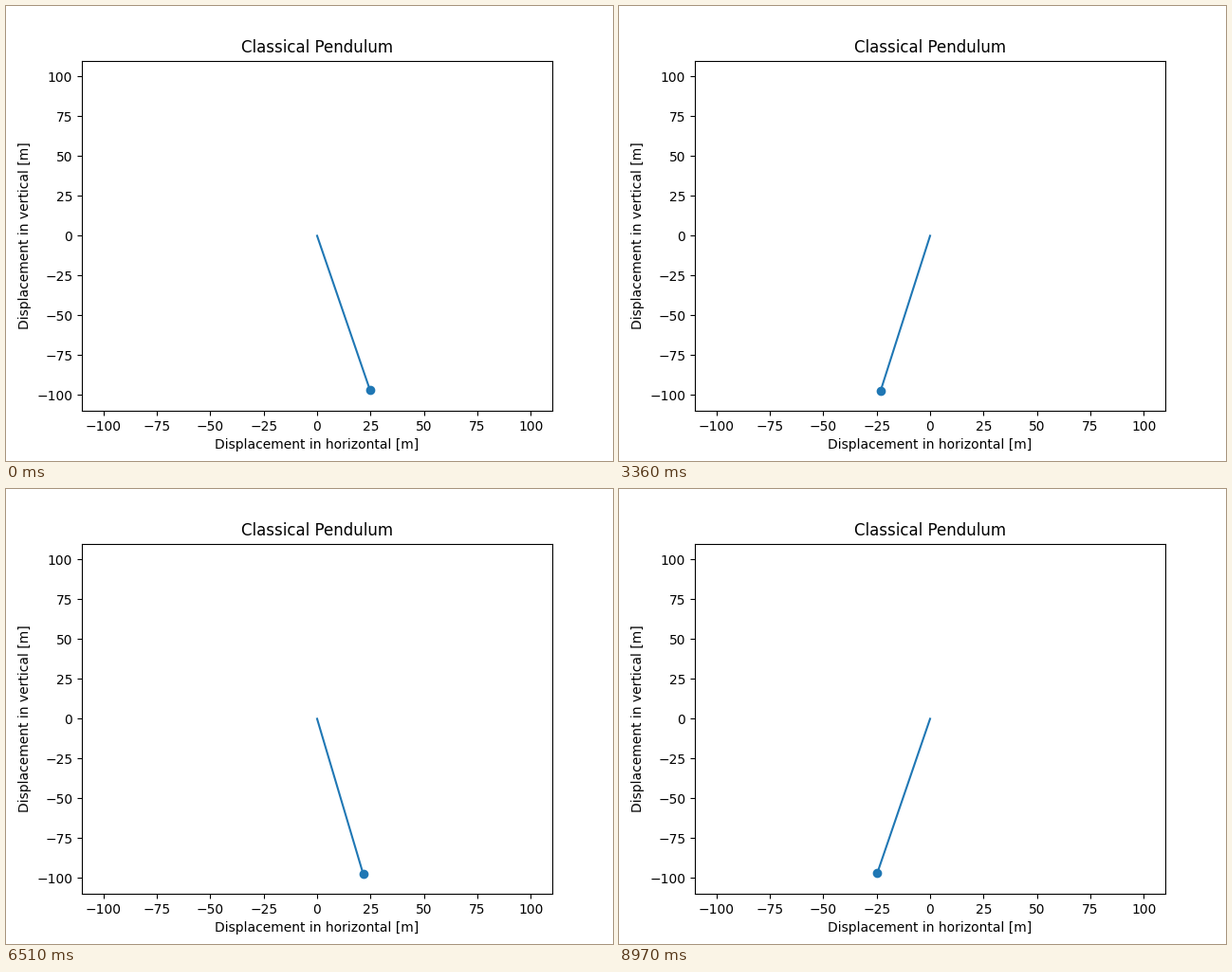
A matplotlib script that plays this animation: 640 by 480 pixels, repeating every 9 s.

```python
import numpy as np
import matplotlib.pyplot as plt
from matplotlib.animation import FuncAnimation

LENGTH = 100.0      # m
GRAVITY = 9.81      # m/s^2
THETA_MAX = 0.25    # rad
DT = 0.1            # simulated seconds per frame
FRAMES = 300
INTERVAL = 30       # ms

OMEGA = np.sqrt(GRAVITY / LENGTH)

plt.rcParams["font.family"] = "DejaVu Sans"

fig, ax = plt.subplots(figsize=(6.4, 4.8), dpi=100)
ticks = np.arange(-100, 101, 25)
ax.set(
    xlim=(-110, 110),
    ylim=(-110, 110),
    xticks=ticks,
    yticks=ticks,
    title="Classical Pendulum",
    xlabel="Displacement in horizontal [m]",
    ylabel="Displacement in vertical [m]",
)

rod, = ax.plot([], [], color="C0")
bob, = ax.plot([], [], "o", color="C0")


def update(frame):
    """Small-angle swing released from rest at THETA_MAX."""
    theta = THETA_MAX * np.cos(OMEGA * DT * frame)
    x, y = LENGTH * np.sin(theta), -LENGTH * np.cos(theta)
    rod.set_data([0, x], [0, y])
    bob.set_data([x], [y])
    return rod, bob


anim = FuncAnimation(fig, update, frames=FRAMES, interval=INTERVAL,
                     repeat=True, repeat_delay=0)
plt.show()
```
